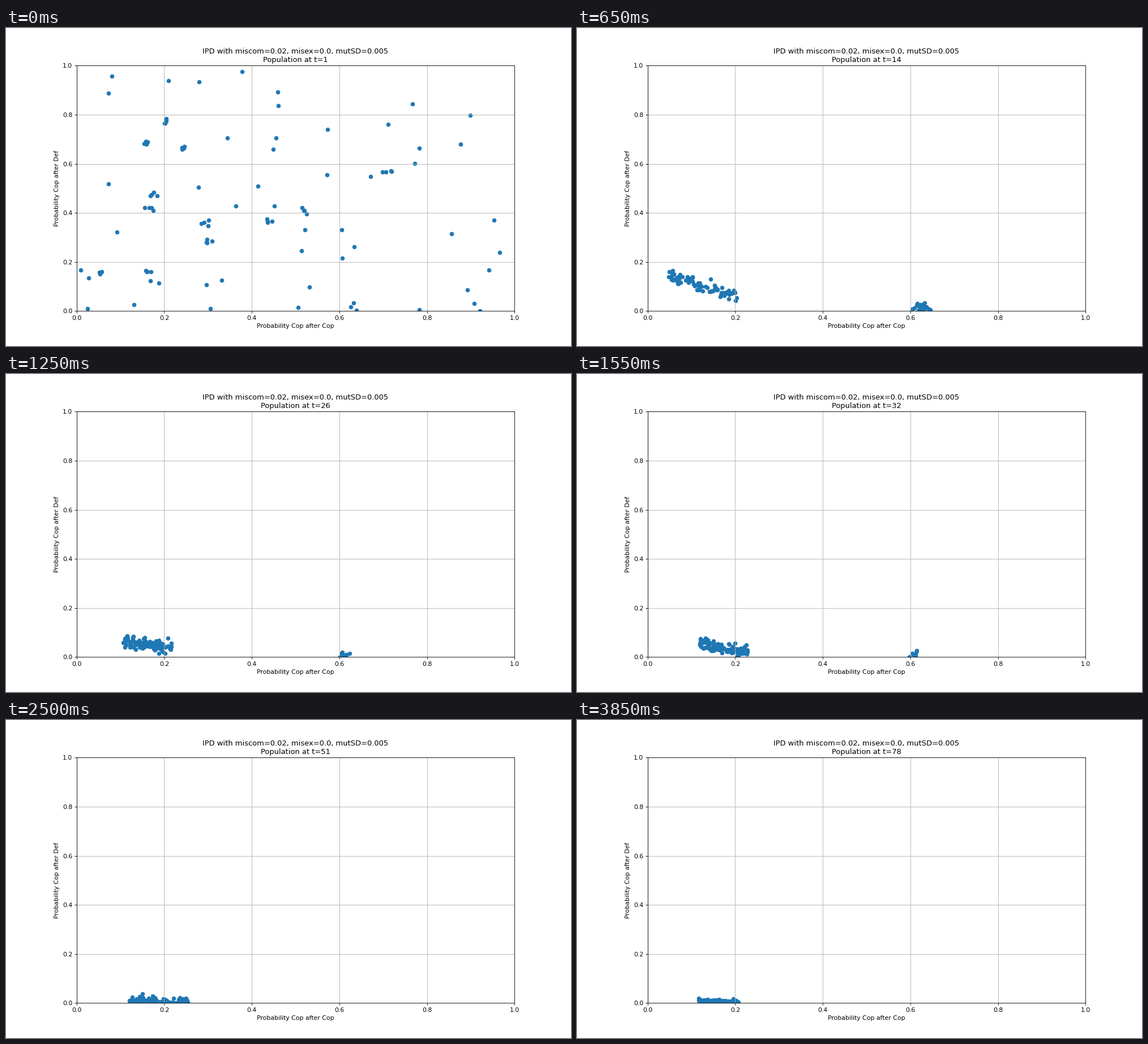
Write a matplotlib script that moves like this. It is 998x561 px and loops after 3950 ms.

```python
import numpy as np
import matplotlib.pyplot as plt
from matplotlib.animation import FuncAnimation

W, H, DPI = 998, 561, 78
SHEET_H = 562         # nominal sheet height, its top row lies off the stage
SIZE = 100            # individuals in the population
MUT_SD = 0.005
STEPS, INTERVAL = 79, 50
LAST_T = 78

# Main lineage: a band whose ends and thickness shift with the generation
BAND_T = [1, 14, 26, 39, 51, 63, 78]
BAND_LEFT = [(.04, .17), (.045, .148), (.105, .066), (.126, .040),
             (.120, .012), (.116, .010), (.116, .005)]
BAND_RIGHT = [(.25, .09), (.205, .056), (.217, .036), (.242, .002),
              (.254, .001), (.222, .004), (.208, .002)]
BAND_SD = [.020, .013, .012, .012, .009, .010, .007]

# Side lineage of half-cooperators, which dies out
SIDE_T = [1, 14, 26, 39, 43]
SIDE_POS = [(.635, .009), (.628, .015), (.608, .012), (.615, .013), (.615, .013)]
SIDE_COUNT = [3, 24, 10, 3, 0]
SIDE_SD = .008

# First generation: small families around these parents, the rest alone
PARENTS = [(.204, .773), (.158, .686), (.255, .668), (.718, .570),
           (.176, .476), (.165, .420), (.520, .405), (.435, .370),
           (.295, .362), (.300, .280), (.055, .160), (.161, .156)]
LITTER = 4

rng = np.random.default_rng(7)


def walk(*shape, sd=MUT_SD):
    """Random walk over the generations, starting at zero."""
    steps = rng.normal(0, sd, (LAST_T, *shape))
    steps[0] = 0
    return steps.cumsum(axis=0)


def wobble(*shape, keep=0.9):
    """Correlated noise with unit variance over the generations."""
    noise = rng.normal(size=(LAST_T, *shape))
    for k in range(1, LAST_T):
        noise[k] = keep * noise[k - 1] + np.sqrt(1 - keep ** 2) * noise[k]
    return noise


def glide(t, times, points):
    return np.array([np.interp(t, times, c) for c in zip(*points)])


n_founders = SIZE - SIDE_COUNT[0]
families = np.repeat(PARENTS, LITTER, axis=0)
families = families + rng.normal(0, 1.5 * MUT_SD, families.shape)
loners = rng.random((n_founders - len(families), 2)) ** (1.2, 1.3)
founders = np.vstack([families, loners])

# Cooperators are replaced first
life = 1 + 11 * rng.random(n_founders) * np.exp(-2 * founders[:, 1])
life[founders[:, 0] > 0.4] *= 0.5
life = np.maximum(life, 1)

founder_walk = walk(n_founders, 2)
band_place = np.abs((2 * rng.random(SIZE) + walk(SIZE, sd=.04)) % 2 - 1)
band_noise = wobble(SIZE)
side_noise = wobble(max(SIDE_COUNT), 2)


def population(t):
    k = t - 1
    old = (founders + founder_walk[k])[life >= t]

    n_side = round(np.interp(t, SIDE_T, SIDE_COUNT))
    side = glide(t, SIDE_T, SIDE_POS) + SIDE_SD * side_noise[k, :n_side]

    n_band = SIZE - len(old) - n_side
    left, right = glide(t, BAND_T, BAND_LEFT), glide(t, BAND_T, BAND_RIGHT)
    band = left + (right - left) * band_place[k, :n_band, None]
    band[:, 1] += np.interp(t, BAND_T, BAND_SD) * band_noise[k, :n_band]

    return np.clip(np.vstack([old, side, band]), 0, 1)


fig = plt.figure(figsize=(W / DPI, H / DPI), dpi=DPI)
scale = SHEET_H / H
ax = fig.add_axes([0.125, 0.11 * scale, 0.775, 0.77 * scale])
dots = ax.scatter(*population(1).T)
ax.set_xlim(0, 1)
ax.set_ylim(0, 1)
ax.set_xlabel("Probability Cop after Cop")
ax.set_ylabel("Probability Cop after Def")
ax.grid(True)
title = ax.set_title("")


def update(i):
    t = min(i + 1, LAST_T)
    dots.set_offsets(population(t))
    title.set_text("IPD with miscom=0.02, misex=0.0, mutSD=0.005\n"
                   f"Population at t={t}")
    return dots, title


anim = FuncAnimation(fig, update, frames=STEPS, interval=INTERVAL,
                     repeat=True, repeat_delay=0)
plt.show()
```
